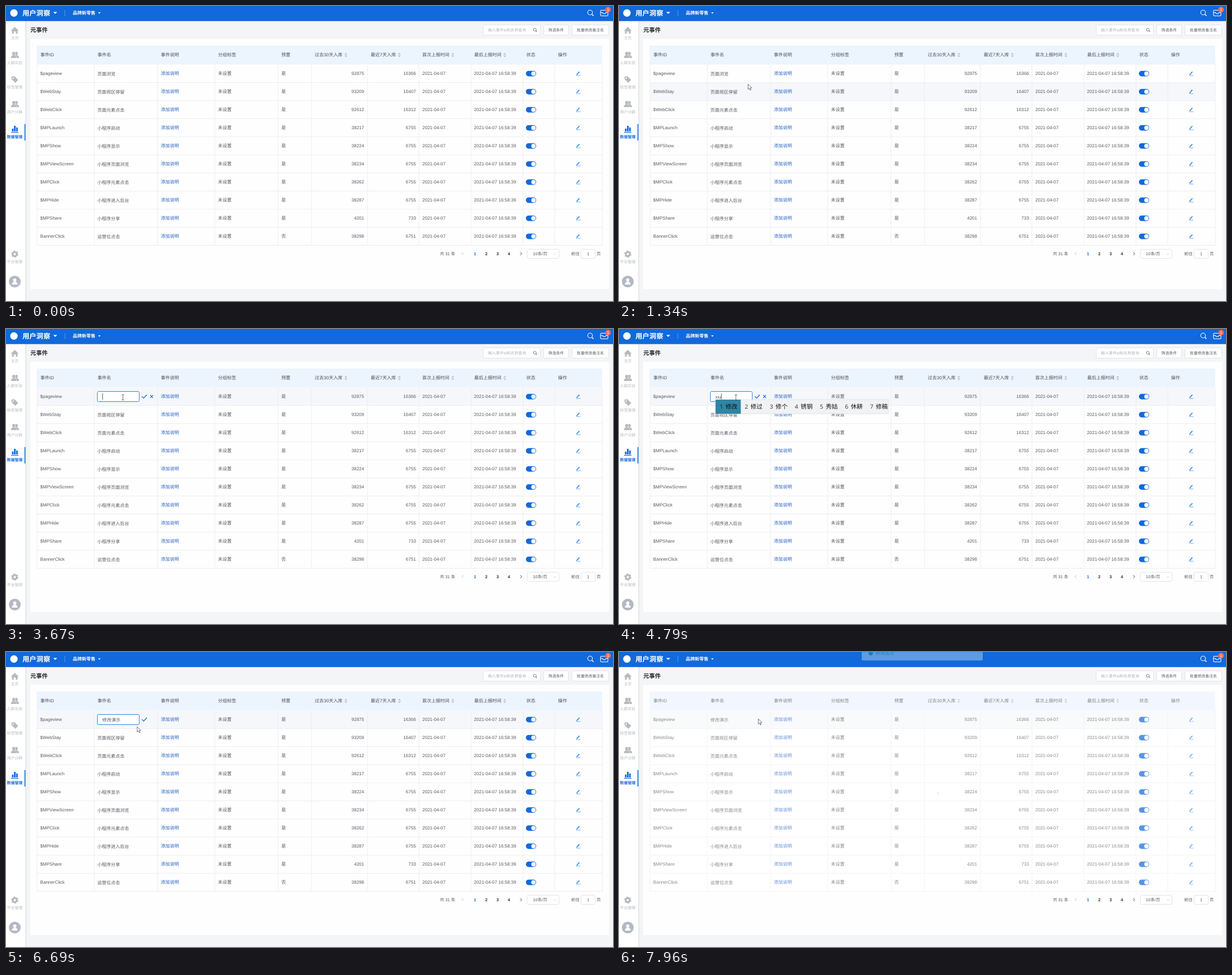
An HTML page for the animation above (7990 ms loop, 1073 by 522 pixels).

```html
<!DOCTYPE html>
<html lang="zh-CN">
<head>
<meta charset="utf-8">
<title>元事件</title>
<style>
html, body { margin: 0; width: 100%; height: 100%; overflow: hidden; background: #f4f5f7; }
svg { display: block; width: 1073px; height: 522px; }
text {
  font-family: "Liberation Sans", "Noto Sans CJK SC", "Noto Sans CJK", sans-serif;
  white-space: pre; text-rendering: geometricPrecision;
}
.ime text { font-family: "Open Sans", "Noto Sans CJK SC", "Noto Sans CJK", sans-serif; }
</style>
</head>
<body>
<svg id="stage" viewBox="0 0 1073 522">
  <g id="base"></g><g id="hover"></g><g id="table"></g>
  <g id="edit"></g><g id="veil"></g><g id="bar" class="ime"></g><g id="top"></g>
</svg>
<script>
const LOOP = 7990, BLUE = '#1169db', INK = '#575a60', GREY = '#b7babf', LINE = '#ebeef5';
const $ = id => document.getElementById(id);

const text = (x, y, s, size = 8, fill = INK, more = '') =>
  `<text x="${x}" y="${y}" font-size="${size}" fill="${fill}" ${more}>${s}</text>`;
const rect = (x, y, w, h, fill, more = '') =>
  `<rect x="${x}" y="${y}" width="${w}" height="${h}" fill="${fill}" ${more}/>`;
const circle = (x, y, r, fill, more = '') => `<circle cx="${x}" cy="${y}" r="${r}" fill="${fill}" ${more}/>`;
const shape = (d, fill, more = '') => `<path d="${d}" fill="${fill}" ${more}/>`;
const stroke = (d, color, w = 1, more = '') => shape(d, 'none', `stroke="${color}" stroke-width="${w}" ${more}`);
const MID = 'text-anchor="middle" ', END = 'text-anchor="end" ', BOLD = 'font-weight="700" ';
const field = (x, y, w, h, color = '#e1e4ea') => rect(x, y, w, h, '#fff', `rx="2" stroke="${color}"`);
const magnifier = (x, y, r, color, w) =>
  circle(x, y, r, 'none', `stroke="${color}" stroke-width="${w}"`) +
  stroke(`M${x + r * .7} ${y + r * .7}l${r * .75} ${r * .75}`, color, w * 1.3);

// ---- page frame ----
const person = (x, y, c) => circle(x, y - 3, 2.9, c) + shape(`M${x - 5} ${y + 5}q0 -5 5 -5t5 5z`, c);
const people = (x, y, c) => person(x + 2.5, y, c) +
  circle(x - 1.8, y - 3, 3.4, '#fff') + shape(`M${x - 8} ${y + 6}q1 -7 6 -7t6 7z`, '#fff') + person(x - 1.8, y, c);
const icons = {
  home: (x, y, c) => shape(`M${x - 7} ${y + .5}l7 -6.5l7 6.5h-2v5.5h-3.2v-4h-3.6v4h-3.2v-5.5z`, c),
  people,
  tag: (x, y, c) => shape(`M${x - 6} ${y - 5}l5.5 -.7l6.5 6.5l-5 5.2l-6.5 -6.3z`, c) + circle(x - 2.8, y - 2.4, 1.2, '#fff'),
  bars: (x, y, c) => rect(x - 5, y - 1, 2.8, 5, c) + rect(x - 1.3, y - 6, 2.8, 10, c) +
    rect(x + 2.4, y - 3, 2.8, 7, c) + rect(x - 6.5, y + 5, 13, 1.2, c),
  gear: (x, y, c) => circle(x, y, 3.6, 'none', `stroke="${c}" stroke-width="3.2"`) +
    circle(x, y, 5.4, 'none', `stroke="${c}" stroke-width="1.8" stroke-dasharray="2.8 2.85"`),
};
const menu = [['home', 43, '主页'], ['people', 87, '人群实验'], ['tag', 130, '标签管理'],
  ['people', 174, '用户分群'], ['bars', 218, '数据管理'], ['gear', 439, '平台管理']];

function drawFrame() {
  let s = rect(0, 0, 1073, 522, '#f4f5f7') + rect(43, 58, 1023, 443, '#fefefe');
  s += rect(34, 26, 1, 496, '#e1e3e6') + rect(35, 26, 2, 496, '#eceef0') + rect(0, 26, 34, 496, '#fff');
  for (const [icon, y, label] of menu) {
    const on = icon === 'bars', c = on ? BLUE : GREY;
    s += icons[icon](15.5, y, c) + text(15.5, y + 16.3, label, 6.85, c, MID + (on ? BOLD : ''));
  }
  s += rect(32.7, 209, 1.6, 29, BLUE);
  s += circle(15.5, 487.7, 10.4, '#b3b9c3') + person(15.5, 488, '#fff');

  s += rect(0, 0, 1073, 26.7, BLUE) + circle(14, 12.3, 6.6, '#fff');
  s += text(29, 16.8, '用户洞察', 12.3, '#fff', BOLD) + shape('M83.5 10.5h7l-3.5 3.6z', '#fff');
  s += rect(103.5, 7, 1, 11, '#5b98e6') + text(118, 15.2, '品牌新零售', 8, '#fff', BOLD);
  s += shape('M162.8 11.3h4.6l-2.3 2.4z', '#fff') + magnifier(1032.5, 11.5, 4.2, '#fff', 1.1);
  s += rect(1051, 7.5, 13, 10, 'none', 'rx="1.5" stroke="#fff" stroke-width="1.1"');
  s += stroke('M1051 11.5h3.5q.5 2.2 3 2.2t3 -2.2h3.5', '#fff', 1.1);
  s += circle(1064.3, 6.5, 5, '#f56c55') + text(1064.3, 9, '1', 7, '#fff', MID);

  s += text(43, 46.3, '元事件', 10.3, '#25282d', BOLD);
  s += field(843.5, 33.5, 101, 18) + text(852, 45.2, '输入事件id和名称查询', 6.9, '#b0b3bb');
  s += magnifier(934.8, 42, 2.5, '#70747c', .9);
  s += field(950.5, 33.5, 44, 18) + text(972.5, 45.2, '筛选条件', 6.85, INK, MID);
  s += field(1000.5, 33.5, 65, 18) + text(1033, 45.2, '批量修改备注名', 6.85, INK, MID);

  s += text(767, 441, '共 31 条', 7.4);
  s += stroke('M808.5 435.7l-2.4 2.5l2.4 2.5', '#b5b9c2', .9) + stroke('M909 435.5l2.6 2.7l-2.6 2.7', '#45484d', 1);
  for (let p = 1; p < 5; p++) s += text(809 + 20 * p, 440.8, p, 7.4, p === 1 ? BLUE : '#303133', MID + BOLD);
  s += field(921.5, 430.5, 56, 16) + text(931.5, 441.3, '10条/页', 7.4);
  s += stroke('M968.3 438l2 2l2 -2', '#c0c4cc', .8);
  s += text(999, 441.3, '前往', 7.4) + field(1016.5, 430.5, 25, 16) + text(1029, 441, '1', 7.4, INK, MID);
  return s + text(1044, 441.3, '页', 7.4);
}

// ---- table ----
const edges = [54.5, 155.5, 267.5, 368.5, 480.5, 539.5, 638.5, 729.5, 821.5, 913.5, 969.5, 1053.5];
const heads = '事件ID,事件名,事件说明,分组标签,预置,过去30天入库,最近7天入库,首次上报时间,最后上报时间,状态,操作'.split(',');
const rows = `$pageview,页面浏览,92875,16366
$WebStay,页面视区停留,93209,16407
$WebClick,页面元素点击,92612,16312
$MPLaunch,小程序启动,38217,6755
$MPShow,小程序显示,38224,6755
$MPViewScreen,小程序页面浏览,38234,6755
$MPClick,小程序元素点击,38262,6755
$MPHide,小程序进入后台,38287,6755
$MPShare,小程序分享,4201,733
BannerClick,运营位点击,38298,6751`.split('\n').map(r => r.split(','));

function drawTable() {
  let s = rect(54, 70, 1000, 33.5, '#ecf4fe');
  heads.forEach((h, i) => s += text(edges[i] + 6.3, 89.3, h, 8, '#4d5158'));
  for (const x of [600.8, 695.3, 789.8, 881.6])
    s += shape(`M${x - 2.7} 85.7l2.7 -2.9l2.7 2.9zM${x - 2.7} 87.6l2.7 2.9l2.7 -2.9z`, '#bcc1ca');
  for (const x of edges) s += rect(x, 103.5, 1, 320, LINE);
  rows.forEach(([id, name, month, week], i) => {
    const y = 122 + 32 * i;
    s += rect(54.5, y + 13, 1000, 1, LINE) + text(60.6, y, id);
    if (i) s += text(161.5, y + .6, name);
    s += text(273.7, y, '添加说明', 8, '#2560c4') + text(374.7, y, '未设置') + text(486.7, y, i < 9 ? '是' : '否');
    s += text(633, y, month, 8, INK, END) + text(724.6, y, week, 8, INK, END);
    s += text(736, y, '2021-04-07') + text(827.3, y, '2021-04-07 16:58:39');
    s += rect(919, y - 7.2, 18.2, 9.6, BLUE, 'rx="4.8"') + circle(932.4, y - 2.4, 3.9, '#fff');
    s += stroke(`M1008 ${y + 1}h7.5`, '#5aa2f2', .9) + stroke(`M1009.4 ${y - 1.2}l4.2 -4.4`, '#3d8eee', 1.7);
    s += shape(`M1008 ${y + .4}l.6 -2.2l1.5 1.5z`, '#3d8eee');
  });
  return s;
}

// ---- pointer: time, x, y, shape, jump ----
const path = [
  [370, 300, 520, 'arrow'], [700, 290, 420, 'arrow'], [930, 262, 290, 'arrow'], [1050, 250, 215, 'arrow'],
  [1150, 240, 167, 'arrow'], [1250, 232, 148, 'arrow'], [1340, 228, 138, 'arrow'], [1470, 214, 131, 'beam'],
  [1610, 201, 129, 'beam'], [2020, 201, 129, 'beam'], [2270, 206.7, 121, 'beam'], [2960, 222, 126, 'arrow', 1],
  [3000, 240, 131, 'arrow', 1], [3050, 206.7, 121, 'beam', 1], [6410, 215, 125, 'arrow', 1],
  [6480, 231.5, 132, 'arrow'], [6690, 231.5, 132, 'arrow'], [6900, 255, 122, 'hand'], [7120, 246, 118, 'hand'],
  [7510, 246, 118, 'arrow']];

function pointerAt(t) {
  const i = path.findLastIndex(p => p[0] <= t);
  if (i < 0) return null;
  const a = path[i], b = path[i + 1];
  const k = b && !b[4] ? (t - a[0]) / (b[0] - a[0]) : 0;
  return { x: a[1] + (k && (b[1] - a[1]) * k), y: a[2] + (k && (b[2] - a[2]) * k), kind: a[3] };
}
const cursors = {
  arrow: shape('M.3 .3v9.2l2.1 -1.9l1.5 3.4l1.5 -.7l-1.5 -3.3h2.8z', '#fff', 'stroke="#3c3a4c" stroke-width=".7"'),
  beam: stroke('M-2 -4.7h1.3q.7 0 .7 .7v8q0 .7 -.7 .7h-1.3M2 -4.7h-1.3q-.7 0 -.7 .7M2 4.7h-1.3q-.7 0 -.7 -.7', '#444', .8),
  hand: shape('M-.8 0q.8 -.9 1.6 0v4l4 .9q1 .3 .8 1.6l-.8 4.5h-4.8l-3.2 -4.3q.6 -1.2 2.4 .3z', '#fff', 'stroke="#3c3a4c" stroke-width=".7"'),
};
const clicks = [[1770, 1870], [2540, 2660], [7330, 7450]];

// row shading fades over 200 ms: the mean of recent hover states
const rowAt = t => { const p = pointerAt(t); return p ? Math.floor((p.y - 103.5) / 32) : -1; };
function drawHover(t) {
  const N = 10, shade = Array(10).fill(0);
  for (let k = 0; k < N; k++) {
    const r = rowAt(t - k * 20);
    if (r >= 0 && r < 10) shade[r] += 1 / N;
  }
  return shade.map((a, i) => a ? rect(55, 104 + 32 * i, 999, 31.5, '#f5f7fa', `opacity="${a}"`) : '').join('');
}

// ---- inline editor ----
const typed = [[2020, '页面浏览'], [2540, '页面浏览'], [3220, '页面浏'], [3320, '页面'], [3470, '页'], [3630, ''],
  [4400, 'x'], [4480, 'xi'], [4540, 'xiu'], [4820, "xiu'g"], [4910, "xiu'ga"], [5000, "xiu'gai"], [5090, '修改'],
  [5320, '修改y'], [5400, '修改ya'], [5490, '修改yan'], [5600, "修改yan's"], [5780, "修改yan'sh"],
  [5870, "修改yan'shi"], [5970, '修改演示']];
const last = (table, t) => table.findLast(k => k[0] <= t);
const pen = document.createElement('canvas').getContext('2d');
pen.font = '8px "Liberation Sans", "Noto Sans CJK SC", "Noto Sans CJK", sans-serif';

function drawEdit(t) {
  if (t < 2020) return text(161.5, 122.6, '页面浏览');
  if (t >= 7510) return text(161.5, 122.6, '修改演示');
  const [since, value] = last(typed, t);
  const focus = t >= 2540 && t < 7400;
  let s = field(161.5, 110.5, 74, 18, focus && t >= 2600 ? '#3a82e2' : '#bcc3d8') + text(170.2, 122.5, value);
  if (focus && Math.floor((t - since) / 500) % 2 === 0)
    s += rect(170.4 + pen.measureText(value).width, 114, .8, 11, '#333');
  s += stroke('M240.2 119.2l3.2 3.2l5.5 -6.2', BLUE, 1.3);
  if (t < 6480 || t >= 6730) s += stroke('M254.9 116.9l5 5m0 -5l-5 5', BLUE, 1.2);
  return s;
}

// ---- input method bar: time, left, words, paging shown ----
const bars = [[4400, 170.7, '下 小 想 行 些 先 向'], [4480, 170.7, '系 西 洗 喜 细 洗 戏'],
  [4540, 170.7, '修 秀 休 袖 绣 锈 羞'], [4610, 170.7, '修改 修过 修个 锈钢 秀姑 休耕 修稿'],
  [4820, 170.7, '修改 修过 修个 锈钢 秀姑 休耕 修稿', 1], [5090, 0, ''],
  [5320, 186.7, '有 一 要 也 与 用 又'], [5400, 186.7, '呀 压 亚 牙 雅 鸭 押'],
  [5490, 186.7, '眼 烟 言 严 演 颜 研'], [5600, 186.7, '演示 颜色 验收 淹水 严肃 眼神 岩石', 1], [5970, 0, '']];

function drawBar(t) {
  const [, x, list, paging] = last(bars, t) || [0, 0, ''];
  if (!list) return '';
  const words = list.split(' '), step = words[0].length > 1 ? 44.3 : 33.6;
  const end = x + step * 7 - (paging ? 0 : 4.5);
  let s = rect(x, 125, end - x + (paging ? 65 : 0), 25, '#f1f2f4', 'stroke="#dcdee1" stroke-width=".8"');
  s += rect(x, 125, step + .3, 25, '#2f85a4');
  words.forEach((w, i) => {
    const left = x + 7.2 + step * i;
    s += text(left, 141, i + 1, 10.3, i ? '#333' : '#123') + text(left + 10.3, 141, w, 10.6, '#111');
  });
  if (paging) {
    s += rect(end + .3, 125, .8, 25, '#d5d7da') + rect(end + 39.3, 125, .8, 25, '#d5d7da');
    s += stroke(`M${end + 9.8} 134.5l-2.6 3l2.6 3`, '#aaa', .9) + stroke(`M${end + 27.5} 134.5l2.8 3l-2.8 3`, '#222', 1);
    const c = end + 50.8;
    s += circle(c, 137.5, 4.5, 'none', 'stroke="#222" stroke-width=".9"') + circle(c - 1.6, 136.3, .7, '#222') +
      circle(c + 1.6, 136.3, .7, '#222') + stroke(`M${c - 2.3} 138.6q2.3 2.8 4.6 0`, '#222', .8);
  }
  return s;
}

// ---- saving: white veil and sliding notice ----
const saving = [[7860, .25], [7890, .5], [7930, .75], [7960, 1]];
const drawVeil = k => k ? rect(54, 70, 1000, 354, '#fff', `opacity="${.29 * k}"`) + circle(563.5, 250, .9, '#a9c4ea') : '';
const drawNotice = k => k ? `<g opacity="${.35 * k}" transform="translate(0 ${15 * k - 27})">` +
  rect(429, 0, 214, 27, '#f0f9eb', 'rx="2"') + circle(445, 14.3, 3.8, '#38a860') +
  text(454, 17.3, '修改成功', 8, '#38a860') + '</g>' : '';

function drawPointer(t) {
  const p = pointerAt(t);
  if (!p) return '';
  const hit = clicks.some(([a, b]) => t >= a && t < b);
  return (hit ? circle(p.x - .5, p.y, 5.6, '#f7ef4a', 'opacity=".85"') : '') +
    `<g transform="translate(${p.x} ${p.y})">${cursors[p.kind]}</g>`;
}

$('base').innerHTML = drawFrame();
$('table').innerHTML = drawTable();
const start = performance.now();
function render(now) {
  const t = Math.max(0, now - start) % LOOP;
  const k = (last(saving, t) || [0, 0])[1];
  $('hover').innerHTML = drawHover(t);
  $('edit').innerHTML = drawEdit(t);
  $('veil').innerHTML = drawVeil(k);
  $('bar').innerHTML = drawBar(t);
  $('top').innerHTML = drawNotice(k) + drawPointer(t);
  requestAnimationFrame(render);
}
render(start);
</script>
</body>
</html>
```
